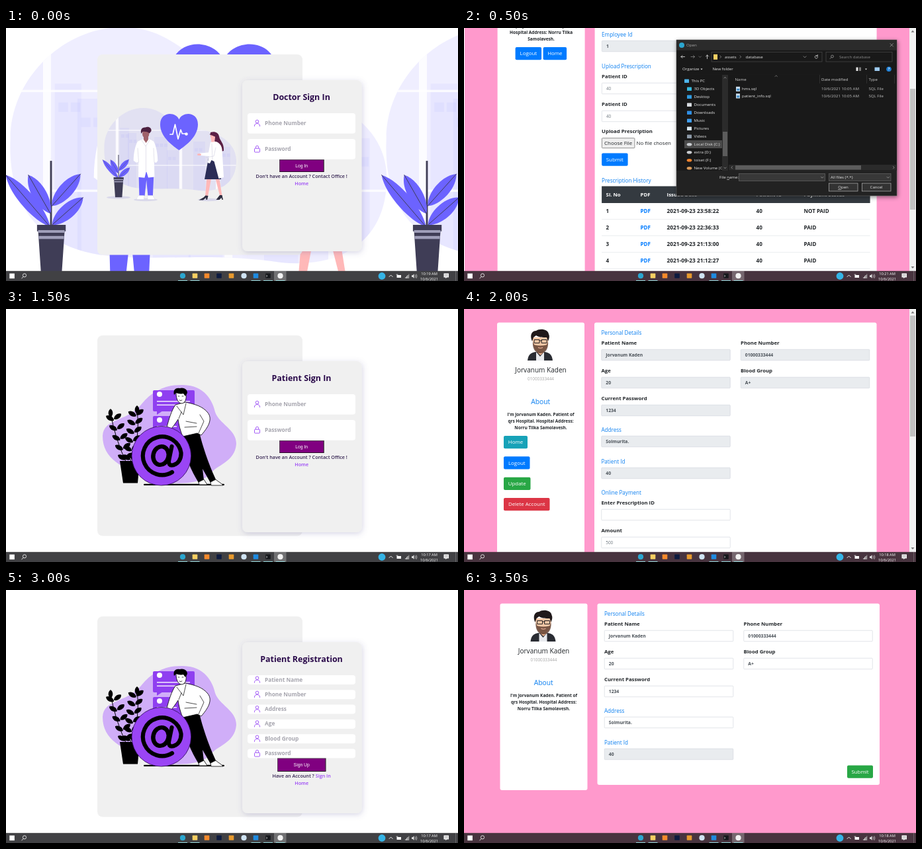
Recreate the animation shown at these times as an HTML page. Size 683 px wide and 383 px high, loop 4000 ms.

```html
<!DOCTYPE html>
<html lang="en">
<head>
<meta charset="utf-8">
<title>Hospital pages</title>
<style>
html, body { margin: 0; width: 100%; height: 100%; overflow: hidden; background: #fff; }
svg { display: block; width: 100vw; height: 100vh; }
text { font-family: "Open Sans", "Noto Sans", sans-serif; white-space: pre; }
.arial { font-family: "Liberation Sans", Arial, sans-serif; }
</style>
</head>
<body>
<svg id="stage" viewBox="0 0 683 383" xmlns="http://www.w3.org/2000/svg"></svg>
<script>
const BLUE = '#007bff', INK = '#212529', VIOLET = '#6c63ff', DARK = '#3f3d56', PURPLE = '#9a45f5';
const NAME = 'Jorvanum Kaden';

// ---- helpers: every text is placed by its vertical middle ----
const rect = (x, y, w, h, fill, more = '') =>
  `<rect x="${x}" y="${y}" width="${w}" height="${h}" fill="${fill}" ${more}/>`;
const circle = (x, y, r, fill, more = '') => `<circle cx="${x}" cy="${y}" r="${r}" fill="${fill}" ${more}/>`;
const oval = (x, y, rx, ry, fill, more = '') => `<ellipse cx="${x}" cy="${y}" rx="${rx}" ry="${ry}" fill="${fill}" ${more}/>`;
const path = (d, fill, more = '') => `<path d="${d}" fill="${fill}" ${more}/>`;
const line = (d, stroke, w = 1, more = '') =>
  `<path d="${d}" fill="none" stroke="${stroke}" stroke-width="${w}" stroke-linecap="round" stroke-linejoin="round" ${more}/>`;
const text = (x, y, size, str, fill = INK, weight = 400, more = '') =>
  `<text x="${x}" y="${(y + size * 0.35).toFixed(2)}" font-size="${size}" fill="${fill}" font-weight="${weight}" ${more}>${str}</text>`;
const mid = (x, y, size, str, fill, weight, more = '') =>
  text(x, y, size, str, fill, weight, 'text-anchor="middle" ' + more);
const move = (x, y, inner) => `<g transform="translate(${x} ${y})">${inner}</g>`;

// ---- taskbar ----
function taskbar(time, bg) {
  const icons = [[267, '#2ba6cf', 1], [285.5, '#f6cf62', 0], [303.5, '#f58a2c', 0], [322, '#0d1b3f', 0],
    [340.5, '#e89a2e', 0], [359.5, '#cfe3f2', 1], [377.5, '#1f8be0', 0], [396, '#16181c', 0], [414.5, '#f2f2f2', 1]];
  let s = rect(0, 367.8, 683, 16, bg) + rect(405, 367.8, 18.5, 16, '#fff', 'opacity=".25"');
  s += rect(5.3, 371.6, 7.6, 7.6, '#fff');
  s += circle(28, 374.4, 2.6, 'none', 'stroke="#fff" stroke-width=".8"') + line('M26 376.6L23.8 379', '#fff', 0.8);
  for (const [x, c, round] of icons) s += round ? circle(x, 375.2, 4.1, c) : rect(x - 3.8, 371.6, 7.6, 7.2, c, 'rx=".7"');
  s += line('M393.5 374.4l1.5 1-1.5 1', '#fff', 0.6);
  for (const x of [267, 285.5, 377.5, 396, 414.5]) s += rect(x - 7, 381.9, 14, 1.1, '#8fcdd0');
  s += circle(568, 375.5, 5.4, '#35b4e6');
  s += line('M579 376.6l2.6-2.6 2.6 2.6', '#fff', 0.9);
  s += rect(590.5, 374, 6.5, 4, '#fff') + line('M590 373.2h2', '#fff', 0.8);
  for (let i = 0; i < 4; i++) s += rect(603.4 + i * 1.6, 377 - i * 1.5, 1.1, 2 + i * 1.5, i < 3 ? '#ddd' : '#999');
  s += path('M613 374.3h1.6l2-2v6.8l-2-2h-1.6z', '#ddd') + line('M618.4 374q1.2 1.7 0 3.4M620 372.8q2 2.9 0 5.8', '#fff', 0.6);
  s += mid(639.5, 371.6, 5.7, time, '#fff') + mid(639.5, 379.6, 5.7, '10/6/2021', '#fff');
  s += path('M661.5 371.5h7.5v6h-3l-1.7 1.8v-1.8h-2.8z', '#fff') + line('M663 373.5h4.5M663 375.4h4.5', '#555', 0.5);
  return s + rect(679.5, 368, 0.6, 15, '#888');
}

// ---- clinic picture ----
function leaf(bx, by, tx, ty, w) {
  const dx = tx - bx, dy = ty - by, n = Math.hypot(dx, dy), px = -dy / n * w, py = dx / n * w;
  const at = (k, s) => `${(bx + dx * k + px * s).toFixed(1)} ${(by + dy * k + py * s).toFixed(1)}`;
  return `M${bx} ${by}C${at(0.2, 1)} ${at(0.75, 1.2)} ${tx} ${ty}C${at(0.75, -1.2)} ${at(0.2, -1)} ${bx} ${by}Z`;
}
function clinic() {
  const blob = 'M148.5 180C148.5 149 176 121 208 121C240 121 250 150 276 152C314 153 348 170 348 201C348 236 322 249 292 246C252 240 225 246 196 242C160 236 147 212 148.5 180Z';
  let s = path(blob, VIOLET, 'opacity=".11"');
  let town = '';
  const block = (x, y, w, h) => {
    town += rect(x, y, w, h, VIOLET, 'opacity=".06"');
    for (let i = x + 2; i < x + w - 4; i += 6.5) town += rect(i, y + 10, 5, 5, VIOLET, 'opacity=".06"');
  };
  block(172, 151, 14, 95); block(184, 159, 13, 87); block(224, 165, 20, 80);
  block(243, 185, 18, 60); block(283, 172, 18, 75); block(325, 180, 14, 60);
  for (const x of [165.8, 262, 317]) town += rect(x, 120, 4.2, 140, '#fff', 'opacity=".85"');
  for (const y of [154.3, 207.3]) town += rect(146, y, 205, 1.2, '#fff', 'opacity=".85"');
  s += `<g clip-path="url(#blob)">${town}</g><clipPath id="blob"><path d="${blob}"/></clipPath>`;
  for (const [x, y, r] of [[170, 256.5, 18], [211, 260, 18], [306, 260, 16]]) s += oval(x, y, r, 2.2, '#d9d8ea');
  // plant
  s += rect(169.5, 192, 1, 35, DARK);
  const tips = [[169.7, 220, 158, 199.5], [170.4, 216, 185.6, 199], [169.5, 227, 146, 199.5], [170.6, 226, 187, 211.5]];
  for (const [a, b, c, d] of tips) s += path(leaf(a, b, c, d, 4.6), VIOLET) + line(`M${a} ${b}L${c} ${d}`, DARK, 0.35);
  s += path('M162.6 226h15.2v3.4h-.6l-1.8 26.8h-10.4l-1.8-26.8h-.6z', DARK);
  s += rect(163.2, 228.8, 14, 1.4, '#a09fba') + rect(163.5, 231.9, 13.4, 1.6, '#a09fba');
  // heart
  s += path('M261.5 185C250 177 233 164 233 146C233 126.500 256 126 261.5 138.5C267 126 290 126.5 290 146C290 164 273 177 261.5 185Z', VIOLET);
  s += line('M248 161h4l3.5-15 4.5 22 4-14 2.3 6h6', '#fff', 1.7) + circle(272.5, 160.5, 2.3, '#fff');
  // man
  s += path('M200.5 218h23l-1.6 36h-7.500l-2.200-24-2.600 24h-8.200z', VIOLET);
  s += path('M200.500 253.500h8v6h-11q0-3.400 3-6zM214 253.500h7.600l3.400 6h-11z', '#fff', 'stroke="#d0cfdf" stroke-width=".4"');
  s += path('M205 169l6.5-1.5 7 1.5 5 3c3.500 8 5.500 17 5.800 29l-2.400 3-3-1 .5 22.500-9.400 1-3-10-2.600 10.300-9.400-1 .3-23-3.600 1-4-3c.2-12 2.400-22 6.300-29z', '#fff');
  s += line('M199 182l1.500 21M223 182l1 21M211.500 178v39M205 170l6 9 6-9', '#d0cfdf', 0.6);
  s += path('M208 163h7v6l-3.4 5-3.6-5z', '#9f616a') + oval(211.2, 160, 5.2, 6.6, '#9f616a');
  s += path('M204.5 160c-2-6 1-10 6-9.5 5-2 10 1 9 5.5l-2.6 3.5c-3-2.5-7-3-10.5-2.5z', '#4d2140');
  // woman
  s += path('M309 158c6-2 12 0 13 6 1 7 8 10 7 22-5 2-8-3-11-9-2-7-6-9-9-13z', '#5b2045');
  s += path('M303.5 226h7l-5.500 29h-4zM316 226h6l4.500 28-3 1.500z', '#ffb8b8');
  s += path('M305.500 254l-1.500 6h-1.500l-.5-3-4 3.500h-6.500l7-4 3-3zM326.500 253l1.500 7h-1.500l-1-3-3 3h-5l5.500-7z', '#2f2e41');
  s += path('M306 197h15l4 32h-25z', '#2b2d57');
  s += path('M309 163c2-4 7-2 7 2.5l-1 7.500h-4.500z', '#ffb8b8') + path('M307.500 161c4-4 9.500-2.500 11 4l-4-1z', '#5b2045');
  s += path('M309 173l8-1c5 1 9 6 9.500 12l2.500 42-7.500 2-7-26-4-2-2.500 5-3.500-1 2.500-10-13-1-1-3.500 13-1z', '#fff');
  s += line('M311 175l1 25M317 181l-3 13-12 2', '#d0cfdf', 0.6) + oval(292, 191.5, 3, 1.5, '#ffb8b8');
  return s;
}

// ---- registration picture ----
function signup() {
  const pen = 'stroke="#000" stroke-width=".8"';
  let s = path('M146 192C148 165 180 172 204 145C222 122 244 114 268 115C300 116 312 138 316 156C322 174 348 182 348 204C346 232 318 236 308 250C290 270 230 266 205 252C178 240 146 228 146 192Z', '#d0aef8');
  s += rect(222, 123, 63, 32, '#8f3ff0', 'rx="2"') + path('M228 154h9l-9 6z', '#8f3ff0') + rect(222, 162, 52, 26, '#8f3ff0', 'rx="2"');
  s += circle(232, 129, 4, '#fff') + circle(232, 168, 4, '#fff');
  for (const y of [139, 144.5]) s += rect(228, y, 50, 1.6, '#fff', 'opacity=".85"');
  s += rect(228, 177, 30, 1.6, '#fff', 'opacity=".85"');
  // plants
  const twig = (x0, y0, x1, y1, n) => {
    s += line(`M${x0} ${y0}Q${x1 + 6} ${(y0 + y1) / 2} ${x1} ${y1}`, '#000', 1);
    for (let i = 0; i < n; i++) {
      const k = i / n, x = x0 + (x1 - x0) * k + 3 * k * (1 - k), y = y0 + (y1 - y0) * k - 3;
      s += path(leaf(x, y, x - 12, y - 7, 4.2), '#000') + path(leaf(x, y - 2, x + 11, y - 10, 4.2), '#000');
    }
    s += path(leaf(x1, y1 + 7, x1, y1 - 6, 4), '#000');
  };
  twig(181, 231, 158, 157, 5);
  twig(188, 231, 198, 152, 6);
  s += path('M172 230h30l-3 33.500h-22z', '#000');
  s += rect(208, 264.8, 122, 2.2, '#000', 'rx="1.1"');
  // leaning man
  s += path('M265 190l27-4c5 22 14 48 25 72l-8 5-12-21 2 17-8 4c-12-20-24-46-26-73z', '#000');
  s += path('M291 262l8-4 5 8h-12zM309 262l8-4c4 4 8 5 11 9h-18z', '#fff', pen);
  s += path('M256 145l15-4c14 3 26 6 34 16 6 8 4 18-10 34l-6-3-22 5c-4-10-6-18-7-26-4 6-8 12-12 16l-5-4c3-12 7-25 13-34z', '#fff', pen);
  s += line('M258 147l10 13 4-17M293 160l6 10-8 18M261 166l4-10M272 170l16 3M270 179l18-1', '#000', 0.7);
  s += path('M257 127c0-5 14-6 15 1 1 8-1 14-6 15-6 0-9-7-9-16z', '#fff', pen);
  s += path('M254 130c-2-7 2-11 8-10 6-2 12 1 12 7l-3 5-3-4c-4 1-8 0-11-1z', '#000');
  s += line('M260 132h2M266 132h2M262 138q2 1.5 4 0', '#000', 0.7);
  // coin with its sign
  s += circle(234.8, 222.3, 44.8, PURPLE, 'stroke="#2b0b52" stroke-width=".8"');
  s += oval(234, 222, 11.5, 14, 'none', 'stroke="#000" stroke-width="6.4" transform="rotate(14 234 222)"');
  return s + line('M250.500 208l-4.500 22q-.5 7 5.500 6.500c9-1.500 13.500-10 13-19A29 29 0 1 0 251 247', '#000', 6.2);
}

// ---- sign in and registration ----
const thin = `stroke="#a259f7" stroke-width="1"`;
const user = (x, y) => circle(x, y - 2.4, 2.3, 'none', thin) + path(`M${x - 4.1} ${y + 5}q0-4.4 4.1-4.4t4.1 4.4`, 'none', thin);
const lock = (x, y) => rect(x - 4, y - 0.8, 8, 5.8, 'none', `rx="1" ${thin}`) +
  path(`M${x - 2.1} ${y - 1}v-1.6a2.1 2.1 0 0 1 4.2 0v1.6`, 'none', thin);

function form(art, title, names, step, h, btn, btnBox, note, link) {
  let s = rect(138, 40, 310, 303.5, '#f0f0f0', 'rx="8"') + art;
  s += rect(357, 79, 180.5, 259, '#f0f0f0', 'rx="8" filter="url(#glow)"');
  s += mid(446.5, 104.3, 12.45, title, '#2a0a4a', 700);
  names.forEach((n, i) => {
    const y = 129 + i * step, c = y + h / 2 - 0.4;
    s += rect(365, y, 163, h, '#fff', 'rx="4"') + (n === 'Password' ? lock : user)(379.5, c);
    s += text(391, c, 8.3, n, '#a6a5ae', 700);
  });
  const [x, y, w, bh] = btnBox;
  s += rect(x, y, w, bh, '#4c4c4c') + path(`M${x} ${y + bh}h${w}v${-bh}l-1 1v${bh - 2}h${2 - w}z`, '#111');
  s += rect(x + 0.8, y + 0.8, w - 1.6, bh - 1.6, '#800080');
  s += mid(446.7, y + bh / 2, 6.8, btn, '#fff', 400, 'class="arial"');
  s += mid(446.7, y + bh + 6.3, 7.2, note + (link ? ` <tspan fill="${PURPLE}">${link}</tspan>` : ''), '#32204f', 600);
  return s + mid(446.7, y + bh + 17.8, 7.2, 'Home', PURPLE, 600);
}
const signIn = (art, title) => form(art, title, ['Phone Number', 'Password'], 39, 30.8, 'Log In',
  [413, 199, 67.5, 19], "Don't have an Account ? Contact Office !");

// ---- profile pages ----
const L = 207.5, R = 418;
const head = (y, str) => text(L, y, 8.1, str, '#0b7ff0');
const label = (x, y, str) => text(x, y, 7.78, str, INK, 700);
const field = (x, y, w, str = '', on = false, weight = 700) =>
  rect(x + 0.25, y + 0.25, w - 0.5, 16.5, on ? '#fff' : '#e9ecef', 'rx="1" stroke="#ced4da" stroke-width=".6"') +
  text(x + 6.8, y + 8.7, weight > 400 ? 6.75 : 6.4, str, weight > 400 ? '#495057' : '#6c757d', weight);
const pair = (x, y, name, val, on) => label(x, y, name) + field(x, y + 10, 195, val, on);
const button = (x, y, w, str, fill = BLUE) => rect(x, y, w, 19.3, fill, 'rx="2"') + mid(x + w / 2, y + 9.7, 7.9, str, '#fff');
const card = (x, y, w, h) => rect(x, y, w, h, '#fff', 'rx="3"');

function about(name, phone, lines) {
  return mid(116, 92, 10.05, name) + mid(116, 106, 6.36, phone, '#a5a5a5') + mid(115.7, 140.5, 10.3, 'About', '#0b7ff0') +
    lines.map((l, i) => mid(116, 159.5 + i * 10, 6.5, l, INK, 700)).join('');
}
function table(y) {
  const cols = [214, 266, 306, 441, 513];
  let s = rect(L, y, 405.5, 25.5, '#343a40');
  ['Sl. No', 'PDF', 'Issued Date', 'Patient Id', 'Payment Status'].forEach((h, i) => s += text(cols[i], y + 13, 7.8, h, '#fff', 700));
  ['23 23:58:22', '23 22:36:33', '23 21:13:00', '23 21:12:27'].forEach((d, i) => {
    const c = y + 38 + i * 24.8;
    const row = [i + 1, 'PDF', '2021-09-' + d, 40, i ? 'PAID' : 'NOT PAID'];
    row.forEach((v, k) => s += text(cols[k], c, k === 2 ? 8.3 : 8, v, k === 1 ? BLUE : INK, 700));
    s += rect(L, c + 12, 405.5, 0.6, '#dee2e6');
  });
  return s;
}
function docFace() {
  let s = circle(115.7, 54, 22.8, '#bcdfe8');
  for (const [x, y, k] of [[101, 49, 4], [130, 47, 2.5], [104, 61, 2], [128, 40, 2]])
    s += line(`M${x - k} ${y}h${2 * k}M${x} ${y - k}v${2 * k}`, '#7fb3c6', 1.4);
  s += path('M99 69.5c1-10 6-13 12-14h9c6 1 11 4 12 14a22.8 22.8 0 0 1-33 0z', '#fff');
  s += path('M111.5 50h8v6l-4 5-4-5z', '#efd0c0') + oval(115.5, 46, 6, 7.5, '#f4ddd0');
  s += path('M108.5 46c-2-8 2-11 7-10.5 5-1 9 3 7 10.5l-2-5q-5 1-10-1z', '#33536a');
  return s + path('M114.3 60h2.6l1.2 10-2.5 3-2.5-3z', '#3f6f8a') + line('M109 56l5 8M122 56l-5 8M107 66v9M124 66v9', '#9cc3d0', 0.7);
}
function manFace() {
  let s = path('M96 78c1-9 5-12 12-13h14c7 1 11 4 12 13z', '#2a2c33') + path('M109 65l6 7 6-7v13h-12z', '#e8eaee');
  s += path('M111 58h9v8l-4.5 4-4.5-4z', '#e8b08d') + path('M104 43h23c1 10-2 22-11.5 22S103 53 104 43z', '#f3c6a5');
  s += path('M104 49l2 5c4 1 5 0 9.5 0s6 1 9.5 0l2-5c1 11-4 18-11.5 18S103 60 104 49z', '#5a3a2c', 'opacity=".8"');
  s += path('M106 43h19v11q-9.5 3-19 0z', '#f3c6a5') + line('M112.5 58.5q3 1.5 6 0', '#f1b7a0', 1.2);
  s += path('M103 49c-4-9-1-16 6-16 5-4 18-3 19 5 2 4 0 8-1 11l-2-6c-6 0-12 0-16-3l-4 3z', '#20191a');
  return s + line('M106.5 46.5h7.5v5h-7.5zM117.5 46.5h7.5v5h-7.5zM114 48h3.5', '#222', 1);
}
function doctor(typed) {
  const put = (y, hint) => field(L, y, 405.5, typed ? '40' : hint, true, 400);
  return card(50, 20.5, 132, 700) + card(197, 20.5, 426, 700) + docFace() +
    about('Md. ' + NAME, '01000111222', [`I'm Md. ${NAME}.`, "Employee of Kaden's Hospital.", 'Hospital Address: Norru Tilka', 'Samolavesh.']) +
    button(77, 202, 39.5, 'Logout') + button(119, 202, 35.5, 'Home') +
    head(36, 'Personal Details') + pair(L, 51, 'Patient Name', 'Md. ' + NAME) + pair(R, 51, 'Phone Number', '01000111222') +
    pair(L, 93, 'Role', 'doctor') + pair(R, 93, 'Salary', '20000') +
    pair(L, 135, 'Join Date', '2020-09-10') + pair(R, 135, 'Current Password', '1234') +
    head(183.5, 'Employee Id') + field(L, 192, 195, '1') + head(231, 'Upload Prescription') +
    label(L, 246, 'Patient ID') + put(256, 'Enter Patien ID') + label(L, 288, 'Patient ID') + put(298, 'Again Enter Patient ID') +
    label(L, 329.5, 'Upload Prescription') +
    rect(L + 0.3, 339.7, 49.5, 15, '#efefef', 'rx="1" stroke="#767676" stroke-width=".8"') +
    text(211.5, 347.5, 7.9, 'Choose File') + text(260, 347.5, 7.9, 'No file chosen') +
    button(L, 362.5, 39.5, 'Submit') + head(404, 'Prescription History') + table(412.5);
}
function patient(edit) {
  let s = card(50, 20.5, 132, edit ? 282.5 : 700) + card(197, 20.5, 426.5, edit ? 274.5 : 700) + manFace() +
    about(NAME, '01000333444', [`I'm ${NAME}. Patient of`, 'qrs Hospital. Hospital Address:', 'Norru Tilka Samolavesh.']) +
    head(36, 'Personal Details') + pair(L, 51, 'Patient Name', NAME, edit) + pair(R, 51, 'Phone Number', '01000333444', edit) +
    pair(L, 93, 'Age', '20', edit) + pair(R, 93, 'Blood Group', 'A+', edit) + pair(L, 135, 'Current Password', '1234', edit) +
    head(183.5, 'Address') + field(L, 192, 195, 'Solmurita.', edit) + head(231, 'Patient Id') + field(L, 240, 195, '40');
  if (edit) return s + button(574.5, 265.5, 39, 'Submit', '#28a745');
  s += button(60, 192, 36, 'Home', '#17a2b8') + button(60, 223.3, 39.5, 'Logout') +
    button(60, 254.7, 40.5, 'Update', '#28a745') + button(60, 286, 69.5, 'Delete Account', '#dc3545');
  return s + head(278.5, 'Online Payment') + label(L, 293.5, 'Enter Prescription ID') + field(L, 303, 195, '', true) +
    label(L, 335.5, 'Amount') + field(L, 345, 195, '500', true, 400) +
    button(L, 369, 39.5, 'Submit') + head(411, 'Prescription History') + table(419.5);
}
const pink = rect(0, 0, 683, 383, '#ff99cc');
const scrollbar = y => rect(673, 0, 10, 368, '#f1f1f1') + rect(674, y, 8, 183, '#c1c1c1') +
  path('M675.5 6.5l2.5-3 2.5 3z', '#777') + path('M675.5 361l2.5 3 2.5-3z', '#777');

// ---- file dialog ----
function dialog() {
  const W = '#e6e6e6', G = '#a9a9a9', t = (x, y, s, c = W) => text(x, y, 6.1, s, c);
  const box = (x, y, w, h, fill, edge) => rect(x, y, w, h, fill, `stroke="${edge}" stroke-width=".7"`);
  const key = k => `<tspan text-decoration="underline">${k}</tspan>`;
  let s = rect(321, 18, 333, 236, '#202020', 'stroke="#555" stroke-width=".6" filter="url(#drop)"');
  s += rect(321.3, 18.3, 332.4, 15.5, '#2b2b2b') + circle(329, 26, 4, '#2ba6cf') + t(336, 26, 'Open', G);
  s += line('M644 23.5l4.5 4.5M648.5 23.5l-4.5 4.5', G, 0.7);
  s += rect(321.3, 33.8, 332.4, 37, '#191919');
  s += line('M333.5 43.5h-5.5m2-2l-2 2 2 2', W, 0.8) + line('M343 43.5h5.5m-2-2l2 2-2 2', '#888', 0.8);
  s += line('M355 42.8l1.7 1.7 1.7-1.7', '#888', 0.7) + line('M367.5 46.5v-5.5m-2 2l2-2 2 2', W, 0.8);
  s += box(374, 36.5, 167, 14.5, '#191919', '#4a4a4a') + rect(377, 39.8, 6, 8, '#f6cf62') + t(394, 43.8, 'assets') + t(425.5, 43.8, 'database');
  for (const x of [387, 417]) s += line(`M${x} 42l1.6 1.7-1.6 1.7`, G, 0.7);
  s += line('M513 42.8l2 2 2-2', G, 0.7) + line('M534 42.3a2.2 2.2 0 1 0 .6 1.6M534.3 40.5v2h-2', W, 0.7);
  s += box(547, 36.5, 100, 14.5, '#191919', '#4a4a4a') + circle(556.5, 43, 1.9, 'none', `stroke="${G}" stroke-width=".7"`) +
    line('M555 44.5l-2 2', G, 0.7) + t(567, 43.8, 'Search database', '#8a8a8a');
  s += t(330, 62.3, 'Organize') + path('M357.5 61.5h3l-1.5 2z', W) + t(375.5, 62.3, 'New folder');
  s += rect(592.5, 59.5, 3, 5.5, W) + rect(597, 59.5, 3, 5.5, '#777') + path('M606 61.5h3l-1.5 2z', W);
  s += rect(620.5, 59.5, 7.5, 5.5, '#9ecbf0') + circle(642, 62.3, 3.8, '#1d7fd6') + mid(642, 62.4, 5.5, '?', '#fff', 700);
  s += rect(321.3, 70.8, 332.4, 145, '#191919') + rect(333, 170, 57, 12, '#4a4a4a');
  const tree = [['This PC', '#4db4ea'], ['3D Objects', '#35b8dd'], ['Desktop', '#2f9be0'], ['Documents', '#d9dde2'], ['Downloads', '#2f8fe6'],
    ['Music', '#3f9ef0'], ['Pictures', '#d8e6ee'], ['Videos', '#8d9aa8'], ['Local Disk (C:)', '#c9ccd0'], ['extra (D:)', '#c9ccd0'],
    ['toiset (F:)', '#f0832d'], ['New Volume (C', '#d99a5a']];
  tree.forEach(([n, c], i) => {
    const y = 80.3 + i * 12, x = i ? 337 : 333;
    s += (i > 7 ? oval(x + 3.5, y, 3.8, 2.3, c) : rect(x, y - 2.8, 7, 5.6, c, 'rx=".6"')) + t(i ? 347.5 : 343.5, y, n);
  });
  s += rect(390, 71, 9, 145, '#2b2b2b') + rect(391, 157, 7, 37, '#5c5c5c') + line('M393 76l1.5-1.7 1.5 1.7M393 211l1.5 1.7 1.5-1.7', G, 0.7);
  s += t(409.5, 77.5, 'Name', '#cfcfcf') + t(540, 77.5, 'Date modified', '#cfcfcf') + t(611.5, 77.5, 'Type', '#cfcfcf');
  for (const x of [537, 608, 650]) s += rect(x, 71, 0.5, 13, '#444');
  s += line('M470 73.5l1.7-1.7 1.7 1.7', G, 0.6);
  ['hms.sql', 'patient_info.sql'].forEach((n, i) => {
    const y = 92.3 + i * 10.5;
    s += rect(411, y - 3.5, 6, 7.2, '#c9dcec') + rect(412.2, y - 0.5, 4, 3, '#3d8cc9') +
      t(420, y, n) + t(540, y, '10/6/2021 10:05 AM', '#bdbdbd') + t(611.5, y, 'SQL File', '#bdbdbd');
  });
  s += rect(400, 207, 253, 8.5, '#2b2b2b') + rect(410, 208, 190, 6.5, '#5c5c5c') +
    line('M405.5 209.5l-1.6 1.7 1.6 1.7M648.5 209.5l1.6 1.7-1.6 1.7', G, 0.7);
  s += t(386, 226, `File ${key('n')}ame:`) + box(415.5, 220.5, 130, 11, '#383838', '#666') + line('M539.5 225.3l1.8 1.8 1.8-1.8', G, 0.7);
  s += box(551.5, 220.5, 93.5, 11, '#383838', '#666') + t(554, 226, 'All files (*.*)') + line('M639 225.3l1.8 1.8 1.8-1.8', G, 0.7);
  s += box(551.5, 235, 43.5, 12, '#333', '#b5b5b5') + mid(573, 241, 6.1, key('O') + 'pen', W);
  return s + box(601.5, 235, 43.5, 12, '#333', '#b5b5b5') + mid(623, 241, 6.1, 'Cancel', W);
}

// ---- slides ----
const GREY = '#414144', ROSE = '#48343f', DOWN = -173;
const white = rect(0, 0, 683, 383, '#fff');
const tile = dx => `<use href="#clinic" transform="translate(${dx - 416.5} -346.1) scale(2.85)"/>`;
const fields = ['Patient Name', 'Phone Number', 'Address', 'Age', 'Blood Group', 'Password'];
const slides = [
  white + tile(0) + tile(568) + signIn('<use href="#clinic"/>', 'Doctor Sign In') + taskbar('10:19 AM', GREY),
  pink + rect(0, 0, 1, 368, '#fff') + move(0.6, DOWN, doctor(true)) + scrollbar(92) + dialog() + taskbar('10:21 AM', ROSE),
  pink + doctor(false) + scrollbar(10) + taskbar('10:20 AM', ROSE),
  white + signIn('<use href="#signup"/>', 'Patient Sign In') + taskbar('10:17 AM', GREY),
  pink + patient(false) + scrollbar(10) + taskbar('10:18 AM', ROSE),
  pink + move(0, DOWN, patient(false)) + scrollbar(92) + taskbar('10:18 AM', ROSE),
  white + form('<use href="#signup"/>', 'Patient Registration', fields, 22.3, 14, 'Sign Up', [410, 254.5, 73.3, 20.3],
    'Have an Account ?', 'Sign In') + taskbar('10:17 AM', GREY),
  pink + move(4.5, 0, patient(true)) + taskbar('10:18 AM', ROSE)
];
const stage = document.getElementById('stage');
stage.innerHTML = `<defs>
  <filter id="glow" x="-20%" y="-20%" width="140%" height="140%"><feDropShadow dx="1" dy="2" stdDeviation="4" flood-color="#5c5696" flood-opacity=".25"/></filter>
  <filter id="drop" x="-10%" y="-10%" width="120%" height="120%"><feDropShadow dx="1" dy="2" stdDeviation="3" flood-color="#000" flood-opacity=".45"/></filter>
  <g id="clinic">${clinic()}</g><g id="signup">${signup()}</g></defs>` +
  slides.map(s => `<g class="slide" display="none">${s}</g>`).join('');
const groups = [...stage.querySelectorAll('.slide')];

function draw(ms) {
  const now = Math.floor(ms % 4000 / 500);
  groups.forEach((g, i) => g.setAttribute('display', i === now ? 'inline' : 'none'));
}
const start = performance.now();
function tick() {
  draw(performance.now() - start);
  requestAnimationFrame(tick);
}
tick();
</script>
</body>
</html>
```
